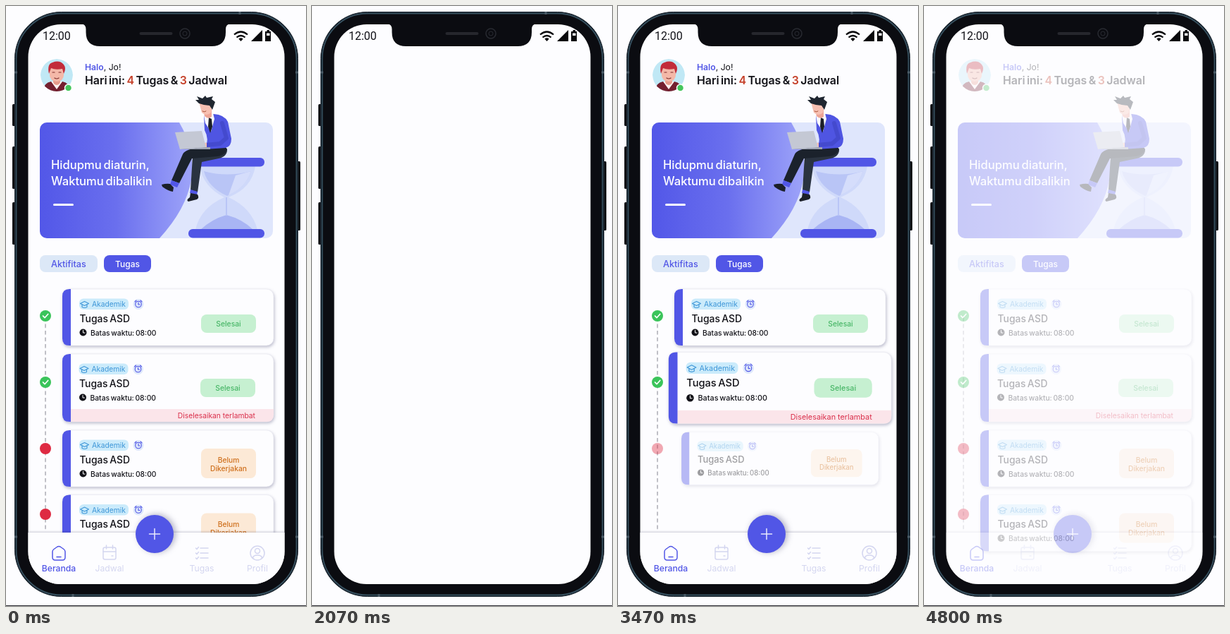
Recreate the animation shown at these times as an HTML page. Size 426 by 850 pixels, loop 4.83 s.

```html
<!DOCTYPE html>
<html lang="id">
<head>
<meta charset="utf-8">
<title>Beranda</title>
<style>
:root { --blue: #5156e6; --paper: #fdfdff; --ink: #121218; --body: #0b0c11; }
html, body { margin: 0; width: 100%; height: 100%; overflow: hidden; background: var(--paper); }
svg { display: block; width: 100vw; height: 100vh; font-family: Inter, sans-serif; }
text { fill: var(--ink); }

/* Every part: --s is the moment (ms) it starts to appear */
.fade { animation: fade 4.83s linear infinite; }
.enter, .pop, .show, .grow {
  animation: enter 4.83s infinite;
  animation-delay: calc(var(--s) * 1ms - 5796ms);
}
.pop { animation-name: pop; transform-box: fill-box; transform-origin: center; }
.show { animation-name: show; }
.grow { animation-name: grow; animation-timing-function: linear; }

@keyframes fade {
  0%, .8% { opacity: 1; }
  7%, 54% { opacity: 0; }
  54.01%, 95.6% { opacity: 1; }
  100% { opacity: .2; }
}
@keyframes enter {
  0%, 20% { opacity: 0; transform: translate(var(--x, 0px), var(--y, 0px)); animation-timing-function: cubic-bezier(.1, .35, .5, 1); }
  28.28%, 100% { opacity: 1; transform: none; }
}
@keyframes pop {
  0%, 20% { opacity: 0; transform: scale(.85); animation-timing-function: linear; }
  24.14% { opacity: 1; transform: scale(1.055); animation-timing-function: ease-out; }
  26.62%, 100% { opacity: 1; transform: none; }
}
@keyframes show {
  0%, 20% { opacity: 0; animation-timing-function: linear; }
  24.14%, 100% { opacity: 1; }
}
@keyframes grow {
  0%, 20% { height: 0; }
  25.8%, 100% { height: 304px; }
}

.card { filter: drop-shadow(1px 2px 2px rgba(40, 40, 90, .3)); }
.paper { fill: var(--paper); }
.blue { fill: var(--blue); }
.dark { fill: var(--ink); }
.mid { text-anchor: middle; }
.s10 { font-size: 10.3px; }
.s12 { font-size: 12.2px; }
.med { font-weight: 500; }
.tight { word-spacing: -.1em; }
.line { fill: none; stroke-width: 1.5; stroke-linecap: round; stroke-linejoin: round; }
.off { stroke: #d4d6f0; }
.on { stroke: var(--blue); }
.white { fill: #fff; }
.offText { fill: #d4d6f0; }
.onText { fill: var(--blue); }
.tag { fill: #3f97d8; }
.good { fill: #49b768; }
.warn { fill: #cf701d; }
.late { fill: #da2f4b; }
</style>
</head>
<body>
<svg viewBox="0 0 426 850" preserveAspectRatio="none">
<defs>
  <linearGradient id="blue">
    <stop offset="0" stop-color="#5257e8"/>
    <stop offset=".5" stop-color="#6a6fee"/>
    <stop offset="1" stop-color="#9ea4f9"/>
  </linearGradient>
  <pattern id="dash" x="55" y="441" width="2" height="9.5" patternUnits="userSpaceOnUse">
    <rect width="2" height="5.5" fill="#c0c0c6"/>
  </pattern>
  <clipPath id="screen"><rect x="31.5" y="26" width="364" height="793" rx="46"/></clipPath>
  <clipPath id="banner"><rect x="48" y="165" width="331" height="164" rx="10"/></clipPath>
  <clipPath id="face"><circle cx="72" cy="98" r="23"/></clipPath>

  <g id="info">
    <rect x="24" y="13.500" width="70" height="15.500" rx="6" fill="#cbebfb"/>
    <g class="line" stroke="#3f97d8" style="stroke-width:1.1">
      <path d="M25.500 20.500L31.500 17.500L37.500 20.500L31.500 23.500ZM28 22V25.500Q31.500 27.500 35 25.500V22"/>
    </g>
    <text class="s10 tag" x="42" y="25">Akademik</text>
    <circle cx="108" cy="21.500" r="7.500" fill="#dfe9fb"/>
    <g class="line on" style="stroke-width:1.1">
      <circle cx="108" cy="21.500" r="4.300"/>
      <path d="M108 19V22H110M103 18L105 16M113 18L111 16"/>
    </g>
    <text class="med tight" x="24.500" y="46.500" font-size="13.900">Tugas ASD</text>
    <circle class="dark" cx="29.500" cy="61.500" r="5"/>
    <path class="line" d="M29.500 58.500V62H32" stroke="#fff" style="stroke-width:1"/>
    <text class="s10 med tight" x="40" y="65.500">Batas waktu: 08:00</text>
  </g>
  <g id="plain">
    <rect class="paper" width="300" height="80" rx="10" stroke="#e8e8f0" stroke-width=".6"/>
    <path class="blue" d="M12 0H10Q0 0 0 10V70Q0 80 10 80H12Z"/>
    <use href="#info"/>
  </g>
  <g id="done">
    <rect x="197" y="36" width="78" height="26" rx="8" fill="#c6f0d1"/>
    <text class="s10 med mid good" x="236" y="53">Selesai</text>
  </g>
  <g id="todo">
    <rect x="197" y="26" width="78" height="42" rx="8" fill="#fce9d6"/>
    <text class="s10 med mid warn" x="236" y="45.500">Belum</text>
    <text class="s10 med mid warn" x="236" y="57.500">Dikerjakan</text>
  </g>
  <g id="ok">
    <circle r="8" fill="#3ac45a"/>
    <path class="line" d="M-3.500 0L-1 2.700L3.700-2.500" stroke="#fff" style="stroke-width:1.700"/>
  </g>
  <circle id="open" r="8" fill="#de2a42"/>
</defs>

<rect class="paper" width="426" height="850"/>

<!-- Phone body -->
<g fill="#0b0c11">
  <rect x="9" y="139" width="5" height="31" rx="1.500"/>
  <rect x="9" y="199" width="5" height="60" rx="1.500"/>
  <rect x="9" y="278" width="5" height="60" rx="1.500"/>
  <rect x="413" y="220" width="5" height="98" rx="1.500"/>
  <rect x="12.500" y="8.500" width="402" height="828" rx="66" stroke="#1d2a36"/>
  <rect x="14.500" y="10.500" width="398" height="824" rx="64" stroke="#36505f" stroke-width="1.800"/>
</g>
<path d="M12 94h4M411 94h4M12 752h4M411 752h4M332 8v4M95 833v4" stroke="#4a5a66" stroke-width="3"/>
<rect class="paper" x="31.500" y="26" width="364" height="793" rx="46"/>

<g clip-path="url(#screen)">
  <!-- Greeting -->
  <g class="fade"><g class="enter" style="--s:2650">
    <g clip-path="url(#face)">
      <circle cx="72" cy="98" r="23" fill="#c0e8f5"/>
      <path d="M51 123Q53 109 64 107H80Q91 109 93 123Z" fill="#74202f"/>
      <path d="M64 107L72 118L80 107Z" fill="#fff4f2"/>
      <rect x="67" y="100" width="10" height="12" rx="5" fill="#e79c8c"/>
      <rect x="62" y="84" width="20" height="23" rx="9" fill="#f4b8a8"/>
      <path d="M61 96Q58 82 66 80Q76 76 82 83Q86 88 82 96L80 89Q70 91 64 88Z" fill="#c22c3a"/>
      <path d="M66 94h3M75 94h3M69 102q3 2 6 0" class="line" stroke="#7c2b2a" style="stroke-width:1.200"/>
    </g>
    <circle cx="88.500" cy="116" r="5" fill="#45c65c" stroke="#fff" stroke-width="1.500"/>
    <text class="s12" x="112" y="91"><tspan class="onText" font-weight="600">Halo</tspan>, Jo!</text>
    <text class="tight" x="112" y="111" font-size="15.900" font-weight="600">Hari ini: <tspan fill="#c5402a">4</tspan> Tugas &amp; <tspan fill="#c5402a">3</tspan> Jadwal</text>
  </g></g>

  <!-- Banner -->
  <g class="fade"><g class="enter" style="--s:2930;--x:10px">
    <g clip-path="url(#banner)">
      <rect x="48" y="165" width="331" height="164" fill="#dfe6fc"/>
      <path d="M48 165H246Q294 246 218 329H48Z" fill="url(#blue)"/>
    </g>
    <g class="tight" font-size="16.600" font-weight="500">
      <text class="white" x="64" y="231">Hidupmu diaturin,</text>
      <text class="white" x="64" y="254">Waktumu dibalikin</text>
    </g>
    <rect class="white" x="67" y="280" width="29" height="3" rx="1.500"/>

    <!-- Hourglass -->
    <path d="M275 227H354Q349 258 316 271Q349 286 357 317H269Q276 286 310 271Q280 256 275 227Z" fill="#cfd9fa"/>
    <path d="M281 234Q314 243 348 234Q340 258 314 269Q287 257 281 234Z" fill="#b9c5f6"/>
    <path d="M326 240L348 234Q340 258 316 268Z" fill="#d5ddfb"/>
    <path d="M276 317Q292 302 313 296Q336 302 351 317Z" fill="#a9b5f4"/>
    <path d="M313 271V297" stroke="#b9c5f6" stroke-width="2"/>
    <rect class="blue" x="270" y="215" width="97" height="12.500" rx="6"/>
    <rect class="blue" x="259" y="316" width="108" height="12.500" rx="6"/>

    <!-- Man with laptop -->
    <path d="M284 202H314Q315 213 302 216L278 221L272 264L262 261L265 213Q268 205 284 202Z" fill="#2a3340"/>
    <path d="M276 201H313Q314 211 300 213L264 216L246 251L235 247L251 210Q255 202 276 201Z" fill="#1b222c"/>
    <path class="blue" d="M235 247L246 251L243 257L233 253ZM262 260L272 263L271 268L261 265Z"/>
    <path d="M221 253Q228 251 233 252L238 257L237 263Q230 262 222 256ZM262 265L272 267Q275 272 271 274L259 277Q255 275 261 271Z" fill="#1b1f28"/>
    <path d="M281 155L295 153Q310 154 315 164L320 188Q320 199 312 201L283 203Q289 188 282 176Z" fill="#4f55e2"/>
    <path d="M281 155L294 152L296 160L291 178L283 166Z" fill="#f8f8fc"/>
    <path d="M288 158L292 160L293 171L290 180L287 171Z" fill="#1b1f28"/>
    <path d="M280 146H292V157Q287 161 282 156Z" fill="#eda596"/>
    <path d="M274 136Q284 130 292 138L291 151Q285 157 278 151Z" fill="#f7c0b2"/>
    <path d="M274 138L269 133L274 133L271 128L279 131L283 127L285 130L294 128L292 132L297 136L293 147L289 141Q282 141 274 138Z" fill="#1f2630"/>
    <path d="M279 149q3 2 5 0" class="line" stroke="#a8543a" style="stroke-width:1"/>
    <path d="M307 166L313 187L304 195L283 197" class="line" stroke="#444ace" style="stroke-width:6"/>
    <path d="M285 194L276 193L274 199L285 201Z" fill="#f7c0b2"/>
    <path d="M240 179L278 177L284 200L247 203Z" fill="#c4c8d4"/>
    <path d="M247 203L284 200H290V203Z" fill="#9ea3b2"/>
  </g></g>

  <!-- Tabs -->
  <g class="fade"><g class="enter" style="--s:2930">
    <rect x="48" y="353" width="82" height="24" rx="8" fill="#dce8f7"/>
    <text class="med onText" x="64" y="370" font-size="12.600">Aktifitas</text>
    <rect class="blue" x="139" y="353" width="67" height="24" rx="8"/>
    <text class="med mid white" x="172.500" y="370" font-size="12">Tugas</text>
  </g></g>

  <!-- Timeline -->
  <g class="fade"><rect class="grow" style="--s:2990" x="55" y="441" width="2" height="304" fill="url(#dash)"/></g>

  <g class="fade" style="--s:3150">
    <g class="show"><use href="#ok" x="56" y="439"/></g>
    <g class="pop"><g class="card" transform="translate(80 401)">
      <use href="#plain"/><use href="#done"/>
    </g></g>
  </g>
  <g class="fade" style="--s:3270">
    <g class="show"><use href="#ok" x="56" y="533"/></g>
    <g class="pop"><g class="card" transform="translate(80 493)">
      <rect class="paper" width="300" height="96" rx="10" stroke="#e8e8f0" stroke-width=".6"/>
      <path d="M12 78H300V86Q300 96 290 96H12Z" fill="#fbe5ea"/>
      <path class="blue" d="M12 0H10Q0 0 0 10V86Q0 96 10 96H12Z"/>
      <use href="#info" x="-.5"/><use href="#done" x="-1" y="-1"/>
      <text class="s10 late" x="274" y="91" text-anchor="end">Diselesaikan terlambat</text>
    </g></g>
  </g>
  <g class="fade" style="--s:3390">
    <g class="show"><use href="#open" x="56" y="627"/></g>
    <g class="pop"><g class="card" transform="translate(80 601)">
      <use href="#plain"/><use href="#todo"/>
    </g></g>
  </g>
  <g class="fade" style="--s:3510">
    <g class="show"><use href="#open" x="56" y="720"/></g>
    <g class="pop"><g class="card" transform="translate(80 692.500)">
      <use href="#plain"/><use href="#todo"/>
    </g></g>
  </g>

  <!-- Navigation -->
  <g class="fade"><g class="enter" style="--s:2930;--y:19px">
    <rect class="paper" x="31" y="746" width="366" height="90" style="filter:drop-shadow(0 -1px 1.500px rgba(40,40,80,.25))"/>
    <g class="line on">
      <path d="M66 773Q66 771 68 769.500L73 766Q75 765 77 766L82 769.500Q84 771 84 773V781Q84 785 80 785H70Q66 785 66 781ZM72 780.500H78"/>
    </g>
    <g class="line off">
      <rect x="138" y="767" width="18" height="17" rx="2.500"/>
      <path d="M138 773H156M142.500 764V769M151.500 764V769M150 779h2"/>
      <path d="M276 768H287M276 775H287M276 782H287M269.500 768l1.500 1.500 2.500-3M269.500 775l1.500 1.500 2.500-3M269.500 782l1.500 1.500 2.500-3"/>
      <circle cx="357" cy="775" r="10"/>
      <circle cx="357" cy="772" r="3.500"/>
      <path d="M350.500 782Q351 778 357 778T363.500 782"/>
    </g>
    <g class="mid s12">
      <text class="med onText" x="75" y="801">Beranda</text>
      <text class="offText" x="147" y="801">Jadwal</text>
      <text class="offText" x="278" y="801">Tugas</text>
      <text class="offText" x="357" y="801">Profil</text>
    </g>
    <circle class="blue" cx="211" cy="748" r="27" style="filter:drop-shadow(3px -1px 4px rgba(40,40,90,.35))"/>
    <path class="line" d="M203.500 748H218.500M211 740.500V755.500" stroke="#e8e9fd"/>
  </g></g>
</g>

<!-- Notch and status bar -->
<path d="M107 25Q113.500 26 113.500 33V37Q113.500 57 133.500 57H292Q312 57 312 37V33Q312 26 318.500 25Z" fill="#0b0c11"/>
<rect x="189.500" y="37" width="47" height="4" rx="2" fill="#26272d"/>
<g fill="none" stroke="#282a31">
  <circle cx="254" cy="39" r="7" stroke-width="1.500"/>
  <circle cx="254" cy="39" r="3"/>
</g>
<text x="52" y="48" font-size="16" style="font-family:Roboto,sans-serif">12:00</text>
<g class="line" stroke="#08080b" style="stroke-width:2.200;stroke-linecap:butt">
  <path d="M324 40.500Q333.500 32.500 343 40.500M327.500 44.500Q333.500 39.500 339.500 44.500"/>
</g>
<path d="M330.300 46.500Q333.500 44 336.700 46.500L333.500 50ZM348 50L364 34V50ZM368 36H370.500V34H374V36H376V50H368Z" fill="#08080b"/>
<path class="paper" d="M370 38.500H374.500V42H370Z"/>

<rect y="849" width="426" height="1" fill="#2c2c34"/>
</svg>
</body>
</html>
```
